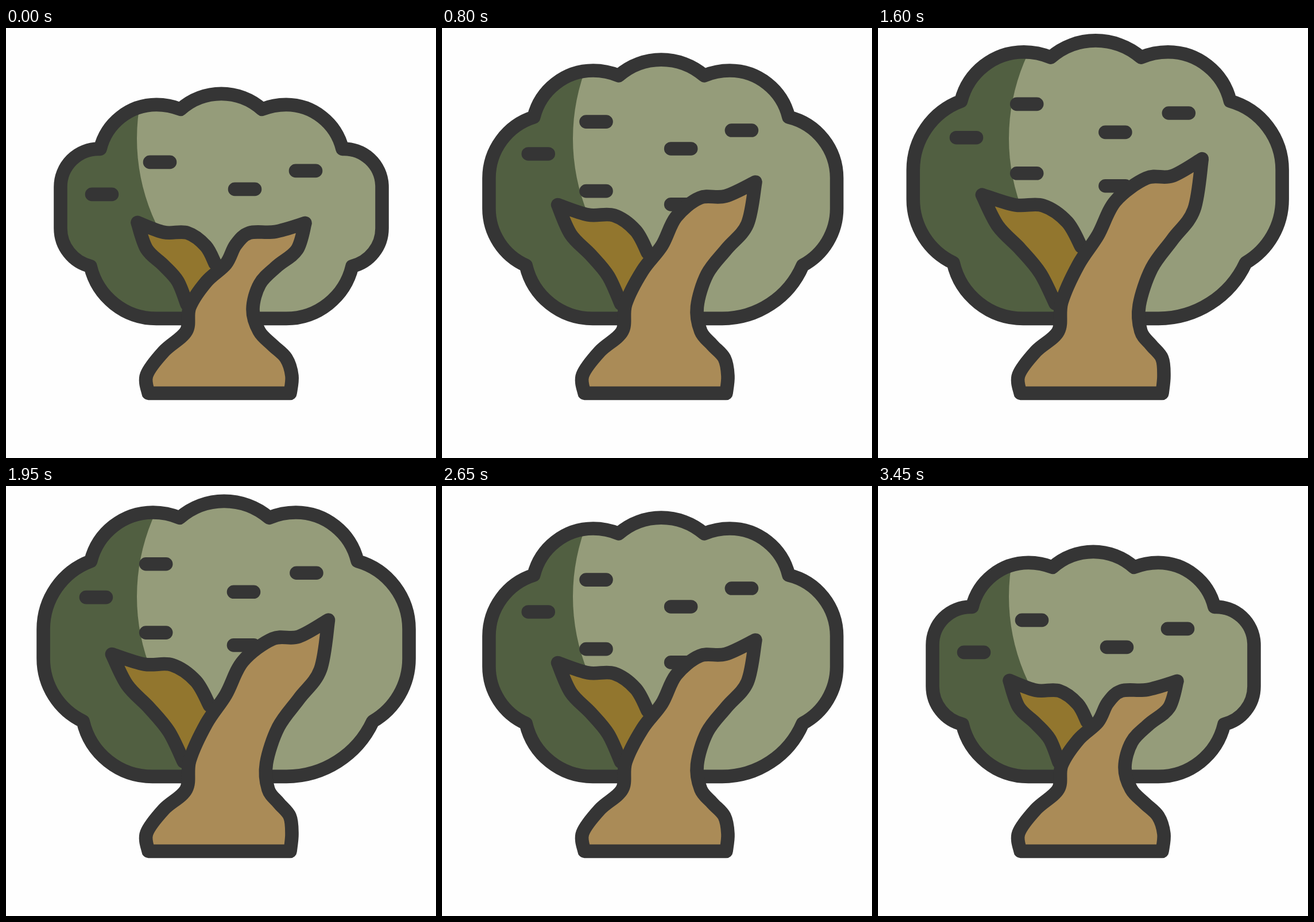
Write an HTML page with a canvas that moves like this. It is 749 px wide and 748 px high and loops after 3.5 s.

```html
<!DOCTYPE html>
<html lang="en">
<head>
<meta charset="utf-8">
<title>Growing tree</title>
<style>
  html, body { margin: 0; width: 100%; height: 100%; overflow: hidden; background: #fefefe; }
  canvas { display: block; }
</style>
</head>
<body>
<canvas id="stage" width="749" height="748"></canvas>
<script>
const ctx = document.getElementById('stage').getContext('2d');
const LOOP = 3500, STEP = 50, TURN = 1725, GROW = 1100, AXIS = 375;
const PAPER = '#fefefe', INK = '#353535', LIGHT = '#959c7a', DARK = '#515f41';
const WOOD = '#aa8b57', SHADE = '#92762e';

// Half of the crown: distance from the axis and height, then how far
// the left and right copies move outward and how far both rise.
const HALF_CROWN = [
  { x: 113, y: 506, left: 0, right: 0, rise: 0 },
  { x: 228, y: 415, left: 2, right: 31, rise: 2 },
  { x: 280, y: 349, left: 17, right: 40, rise: 42 },
  { x: 280, y: 277, left: 17, right: 40, rise: 19 },
  { x: 211, y: 211, left: 6, right: 22, rise: 68 },
  { x: 113, y: 134, left: -1, right: 16, rise: 73 },
  { x: 71, y: 142, left: -4, right: 13, rise: 72 },
  { x: 0, y: 115, left: -8, right: 8, rise: 73 }
];
const DASHES = [[268, 234], [167, 290], [416, 281], [522, 249], [268, 380], [416, 414]];
const TRUNK_LEFT = [[248, 636], [245, 604], [275, 563], [314, 528], [320, 486], [349, 442],
  [383, 411], [400, 378], [424, 357], [469, 355], [521, 340]];
const TRUNK_RIGHT = [[521, 340], [507, 386], [472, 415], [442, 446], [430, 490],
  [441, 528], [464, 552], [488, 575], [498, 606], [495, 636]];
const BRANCH_LOWER = [[315, 481], [299, 441], [274, 413], [245, 385], [229, 339]];
const BRANCH_UPPER = [[229, 339], [275, 356], [316, 357], [348, 380], [364, 410]];

const clamp = x => Math.min(1, Math.max(0, x));
const ease = x => (1 - Math.cos(Math.PI * clamp(x))) / 2;
const mix = (a, b, k) => a + (b - a) * k;

// How far a point of each limb travels while the tree grows.
const trunkShift = (x, y) => [
  31 * clamp((606 - y) / 200) * ease((x - 385) / 40),
  -88 * clamp((528 - y) / 188) ** 1.7
];
const branchShift = (x, y) => [-0.13 * Math.max(0, 830 - x - y), -38 * ease((495 - y) / 150)];

function moveLimb(points, shift, { grow, stretch }) {
  return points.map(([x, y]) => {
    const [dx, dy] = shift(x, y);
    return [x + dx * grow * (1 + 0.4 * stretch), y + dy * grow * (1 + 0.27 * stretch)];
  });
}

// The grown canopy swells around a point near its base.
function swell(x, y, { grow, stretch }) {
  const k = 0.042 * stretch * grow;
  return [x + (x - 478) * k, y + (y - 507) * k];
}

// Smooth curve through all points, continuing the current path.
function spline(points) {
  const at = i => points[Math.min(points.length - 1, Math.max(0, i))];
  const handle = (i, dir) => [0, 1].map(k => at(i)[k] + dir * (at(i + 1)[k] - at(i - 1)[k]) / 6);
  ctx.lineTo(...points[0]);
  for (let i = 0; i < points.length - 1; i++) {
    ctx.bezierCurveTo(...handle(i, 1), ...handle(i + 1, -1), ...at(i + 1));
  }
}

// Circular arc between an apex with the given inward normal and a notch.
function bump(apex, notch, normal, toApex) {
  const dx = notch[0] - apex[0], dy = notch[1] - apex[1];
  const r = (dx * dx + dy * dy) / (2 * (dx * normal[0] + dy * normal[1]));
  const cx = apex[0] + normal[0] * r, cy = apex[1] + normal[1] * r;
  const angle = p => Math.atan2(p[1] - cy, p[0] - cx);
  const ends = [angle(apex), angle(notch)];
  if (toApex) ends.reverse();
  ctx.arc(cx, cy, r, ...ends);
}

function drawCrown(pose) {
  const half = side => HALF_CROWN.map(({ x, y, left, right, rise }) => {
    const out = x + (side < 0 ? left : right) * pose.grow;
    return swell(AXIS + side * out, y - rise * pose.grow, pose);
  });
  // Apex index, notch index and inward normal for a left-hand half.
  const arcs = [[0, 1, 0, -1], [2, 1, 1, 0], [3, 4, 1, 0], [5, 4, 0, 1], [5, 6, 0, 1], [7, 6, 0, 1]];
  const left = half(-1), right = half(1);
  ctx.beginPath();
  for (const [a, n, nx, ny] of arcs) bump(left[a], left[n], [nx, ny], a > n);
  for (const [a, n, nx, ny] of arcs.reverse()) bump(right[a], right[n], [-nx, ny], a < n);
  ctx.closePath();
  ctx.fillStyle = DARK;
  ctx.fill();
  ctx.save();
  ctx.clip();
  const lit = new Path2D();
  lit.arc(573, 193, 345, 0, 2 * Math.PI);
  ctx.fillStyle = LIGHT;
  ctx.fill(lit);
  ctx.restore();
  ctx.stroke();
}

function drawDashes(pose) {
  ctx.beginPath();
  for (const [x, y] of DASHES) {
    const rise = 86 + 0.38 * Math.max(0, y - 300);
    const [cx, cy] = swell(x, y - rise * pose.grow, pose);
    ctx.moveTo(cx - 17.5, cy);
    ctx.lineTo(cx + 17.5, cy);
  }
  ctx.stroke();
}

function drawLimb(edges, shift, color, closed, pose) {
  ctx.beginPath();
  for (const edge of edges) spline(moveLimb(edge, shift, pose));
  if (closed) ctx.closePath();
  ctx.fillStyle = color;
  ctx.fill();
  ctx.stroke();
}

function draw(now) {
  const t = Math.floor((now % LOOP) / STEP) * STEP;
  const u = t <= TURN ? t : 2 * TURN - t;
  const pose = {
    grow: ease(u / GROW),
    stretch: mix(-0.07, 1.11, ease((u - GROW) / (TURN - GROW)))
  };

  ctx.setTransform(1, 0, 0, 1, 0, 0);
  ctx.fillStyle = PAPER;
  ctx.fillRect(0, 0, 749, 748);
  ctx.translate(0, -0.6);
  ctx.strokeStyle = INK;
  ctx.lineWidth = 23.6;
  ctx.lineCap = ctx.lineJoin = 'round';
  drawCrown(pose);
  drawDashes(pose);
  drawLimb([BRANCH_LOWER, BRANCH_UPPER], branchShift, SHADE, false, pose);
  drawLimb([TRUNK_LEFT, TRUNK_RIGHT], trunkShift, WOOD, true, pose);
}

const start = performance.now();
function tick() {
  draw(performance.now() - start);
  requestAnimationFrame(tick);
}
tick();
</script>
</body>
</html>
```
